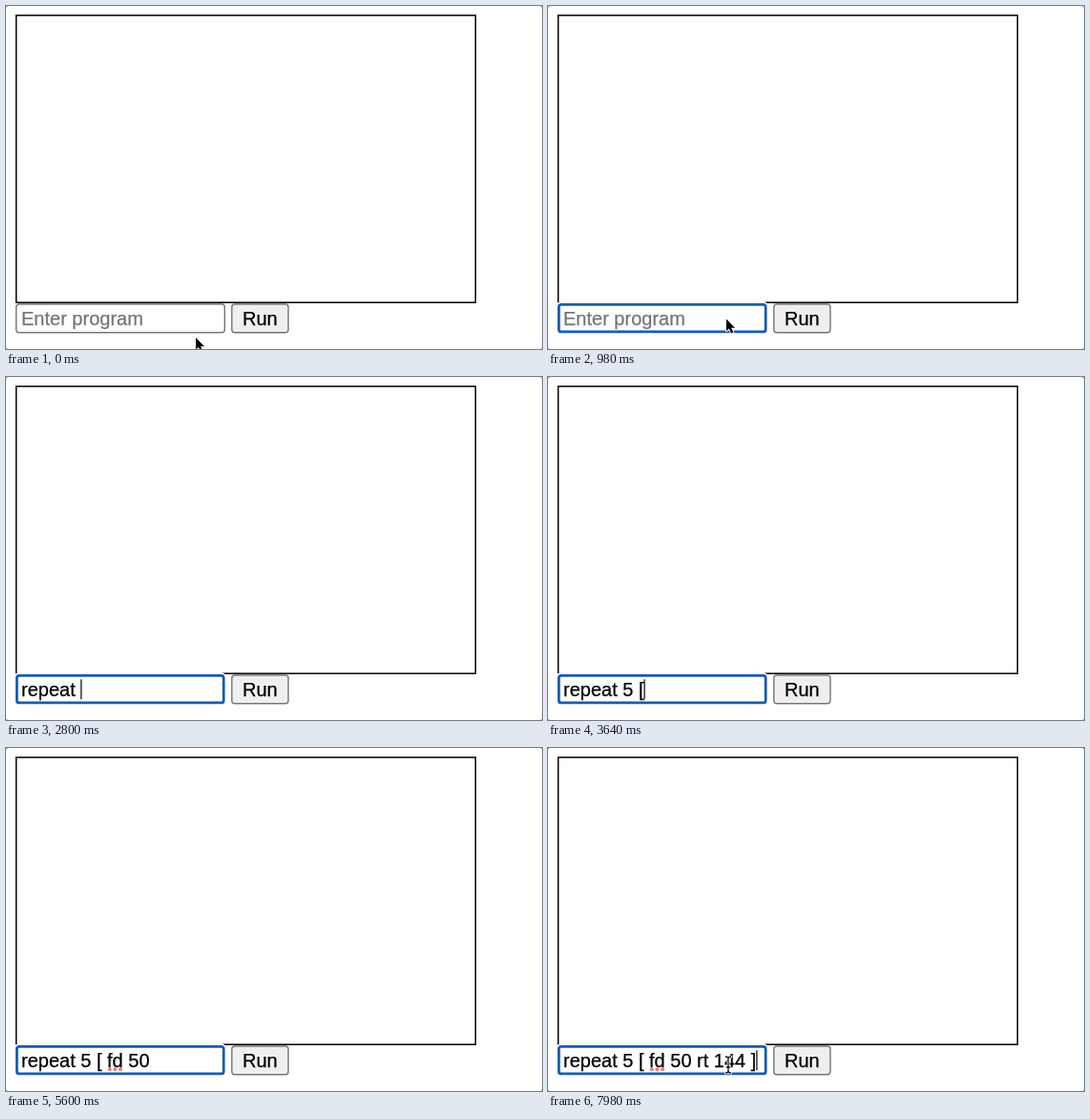
An HTML page that plays this animation: 562 px wide and 360 px high, repeating every 8 s.

```html
<!DOCTYPE html>
<html lang="en">
<head>
<meta charset="utf-8">
<title>Turtle program input</title>
<style>
  html, body { margin: 0; width: 100%; height: 100%; overflow: hidden; background: #8c8c8c; }
  svg { display: block; width: 562px; height: 360px; }
  text {
    font: 20px "Liberation Sans", Arial, sans-serif;
    font-kerning: none;
    white-space: pre;
    fill: currentColor;
    stroke: currentColor;
    stroke-width: 0.25;
  }
  #placeholder { color: #757575; }
  .control { stroke: #767676; stroke-width: 1.4; }
</style>
</head>
<body>
<svg viewBox="0 0 562 360">
  <defs>
    <path id="beamShape" d="M186.3 324Q189 324 189 326Q189 324 191.7 324M189 326V339
      M186.3 341Q189 341 189 339Q189 341 191.7 341M187.2 335H190.8"/>
  </defs>
  <rect width="562" height="360" rx="2.5" fill="#fff"/>
  <rect x="10.7" y="9.8" width="481.6" height="301.4" fill="#fff" stroke="#000" stroke-width="1.5"/>
  <rect class="control" x="10.7" y="313" width="218.6" height="29.8" rx="3" fill="#fff"/>
  <g id="focus" fill="#fff">
    <rect x="8.8" y="310" width="221.5" height="35" rx="5"/>
    <rect x="11.4" y="313.4" width="216.8" height="28.5" rx="2.5" stroke="#1b5ca9" stroke-width="2.8"/>
  </g>
  <rect class="control" x="236.8" y="313" width="59.2" height="29.8" rx="3" fill="#efefef"/>
  <text x="248" y="334.7">Run</text>
  <g id="spelling" fill="#e8807d">
    <circle cx="108.8" cy="337.2" r="2"/>
    <circle cx="114.4" cy="337.2" r="2"/>
    <circle cx="120" cy="337.2" r="2"/>
  </g>
  <text id="placeholder" x="16" y="334.7">Enter program</text>
  <text id="typed" x="16" y="334.7"></text>
  <rect id="caret" y="317.3" width="1.2" height="21"/>
  <path id="arrow" d="M0 0V12.6L2.9 9.9L5.1 15L7.3 14L5.1 9.2H9Z"
    stroke="#fff" stroke-width="1.8" stroke-linejoin="round" paint-order="stroke"/>
  <g id="beam" fill="none" stroke-linecap="round">
    <use href="#beamShape" stroke="#fff" stroke-width="3"/>
    <use href="#beamShape" stroke="#111" stroke-width="1.3"/>
  </g>
</svg>
<script>
const DURATION = 8000;
const TICK = 70;         // the screen refreshes on this grid
const KEY_PACE = 115;
const BLINK = 525;
const FOCUS_AT = 455;
const RETURN_AT = 7490;
const BEAM_AT = 7980;

const bursts = [
  { text: "repeat ", at: 2100 },
  { text: "5 ", at: 3150 },
  { text: "[", at: 3640 },
  { text: " fd", at: 3920 },
  { text: " ", at: 4550 },
  { text: "50 ", at: 4800 },
  { text: "rt ", at: 5670 },
  { text: "144 ", at: 6130 },
  { text: "]", at: 6930 }
];
const keys = bursts.flatMap(({ text, at }) =>
  [...text].map((char, i) => ({ char, at: at + i * KEY_PACE })));

const el = id => document.getElementById(id);
const show = (id, on) => el(id).setAttribute("visibility", on ? "visible" : "hidden");
const lerp = (a, b, p) => a + (b - a) * p;
const progress = (t, from, span) => Math.min(1, Math.max(0, (t - from) / span));

const pen = document.createElement("canvas").getContext("2d");
pen.font = '20px "Liberation Sans", Arial, sans-serif';
pen.fontKerning = "none";

function arrowPosition(t) {
  if (t < RETURN_AT) {
    const p = progress(t, 0, 560);
    return [lerp(199, 187, p), lerp(348, 328.5, p) - 31 * Math.sin(Math.PI * p)];
  }
  const p = Math.sin(progress(t, RETURN_AT, 210) * Math.PI / 2);
  return [lerp(113, 186, p), lerp(345, 328, p)];
}

function draw(time) {
  const t = Math.floor(time / TICK) * TICK;
  const pressed = keys.filter(key => key.at <= t);
  const text = pressed.map(key => key.char).join("");
  const lastInput = pressed.length ? pressed.at(-1).at : FOCUS_AT;

  el("typed").textContent = text;
  el("caret").setAttribute("x", 16 + pen.measureText(text).width);
  show("caret", t >= FOCUS_AT && Math.floor((t - lastInput) / BLINK) % 2 === 0);
  show("placeholder", !text);
  show("focus", t >= FOCUS_AT);
  show("spelling", text.includes("fd "));

  el("arrow").setAttribute("transform", `translate(${arrowPosition(t).join(" ")})`);
  show("arrow", !text || (t >= RETURN_AT && t < BEAM_AT));
  show("beam", t >= BEAM_AT);
}

const start = performance.now();
function tick(now) {
  draw(Math.max(0, now - start) % DURATION);
  requestAnimationFrame(tick);
}
draw(0);
requestAnimationFrame(tick);
</script>
</body>
</html>
```
